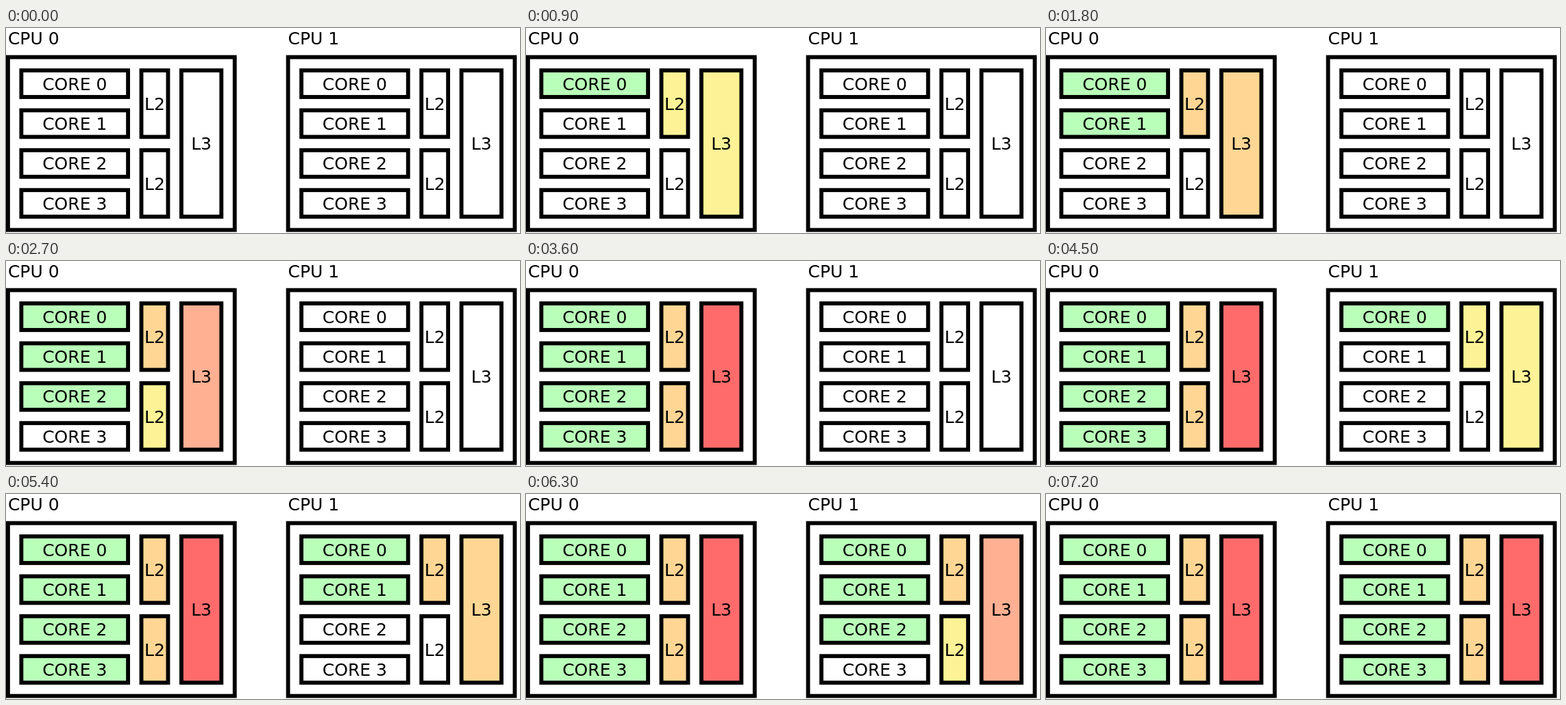
Recreate the animation shown at these times as an HTML page. Size 750 by 300 pixels, loop 8100 ms.

```html
<!DOCTYPE html>
<html lang="en">
<head>
<meta charset="utf-8">
<title>CPU cache sharing</title>
<style>
  html, body { margin: 0; width: 100%; height: 100%; overflow: hidden; background: #fff; }
  svg { display: block; }
  rect { fill: #fff; stroke: #000; stroke-width: 5.84; }
  text { font: 25px "DejaVu Sans", sans-serif; fill: #000; }
  .label { text-anchor: middle; }
</style>
</head>
<body>
<svg id="stage" width="750" height="300" viewBox="0 0 750 300"></svg>
<script>
const STEP = 900, CORES = 4, CPUS = 2;
const UNIT = 19.46, LEFT = 2.92, TOP = 42.6, CPU_SPACING = 21;
const IDLE = '#fff', ACTIVE = '#b9ffb9';
const LOAD = [IDLE, '#fdf396', '#ffd694', '#ffb093', '#ff6b6b'];
const stage = document.getElementById('stage');

function add(tag, attributes, content = '') {
  const node = document.createElementNS('http://www.w3.org/2000/svg', tag);
  for (const key in attributes) node.setAttribute(key, attributes[key]);
  node.textContent = content;
  return stage.appendChild(node);
}

// Positions and sizes are in grid units.
function box(x, y, width, height, label) {
  const px = LEFT + x * UNIT, py = TOP + y * UNIT;
  const w = width * UNIT, h = height * UNIT;
  const rect = add('rect', { x: px, y: py, width: w, height: h });
  if (label) add('text', { class: 'label', x: px + w / 2, y: py + h / 2 + 9.2 }, label);
  return rect;
}

function buildCpu(index) {
  const x = index * CPU_SPACING;
  add('text', { x: LEFT + x * UNIT, y: 24 }, `CPU ${index}`);
  box(x, 0, 17, 13);
  return {
    cores: Array.from({ length: CORES }, (_, i) => box(x + 1, 1 + 3 * i, 8, 2, `CORE ${i}`)),
    l2: [0, 1].map(i => box(x + 10, 1 + 6 * i, 2, 5, 'L2')),
    l3: box(x + 13, 1, 3, 11, 'L3')
  };
}

const clamp = (value, max) => Math.max(0, Math.min(max, value));
const cpus = Array.from({ length: CPUS }, (_, i) => buildCpu(i));

function draw(now) {
  const busy = Math.floor(now / STEP) % (CPUS * CORES + 1);
  cpus.forEach((cpu, index) => {
    const active = clamp(busy - index * CORES, CORES);
    cpu.cores.forEach((core, i) => core.style.fill = i < active ? ACTIVE : IDLE);
    cpu.l2.forEach((cache, i) => cache.style.fill = LOAD[clamp(active - 2 * i, 2)]);
    cpu.l3.style.fill = LOAD[active];
  });
}

const start = performance.now();
function tick() {
  draw(performance.now() - start);
  requestAnimationFrame(tick);
}
tick();
</script>
</body>
</html>
```
